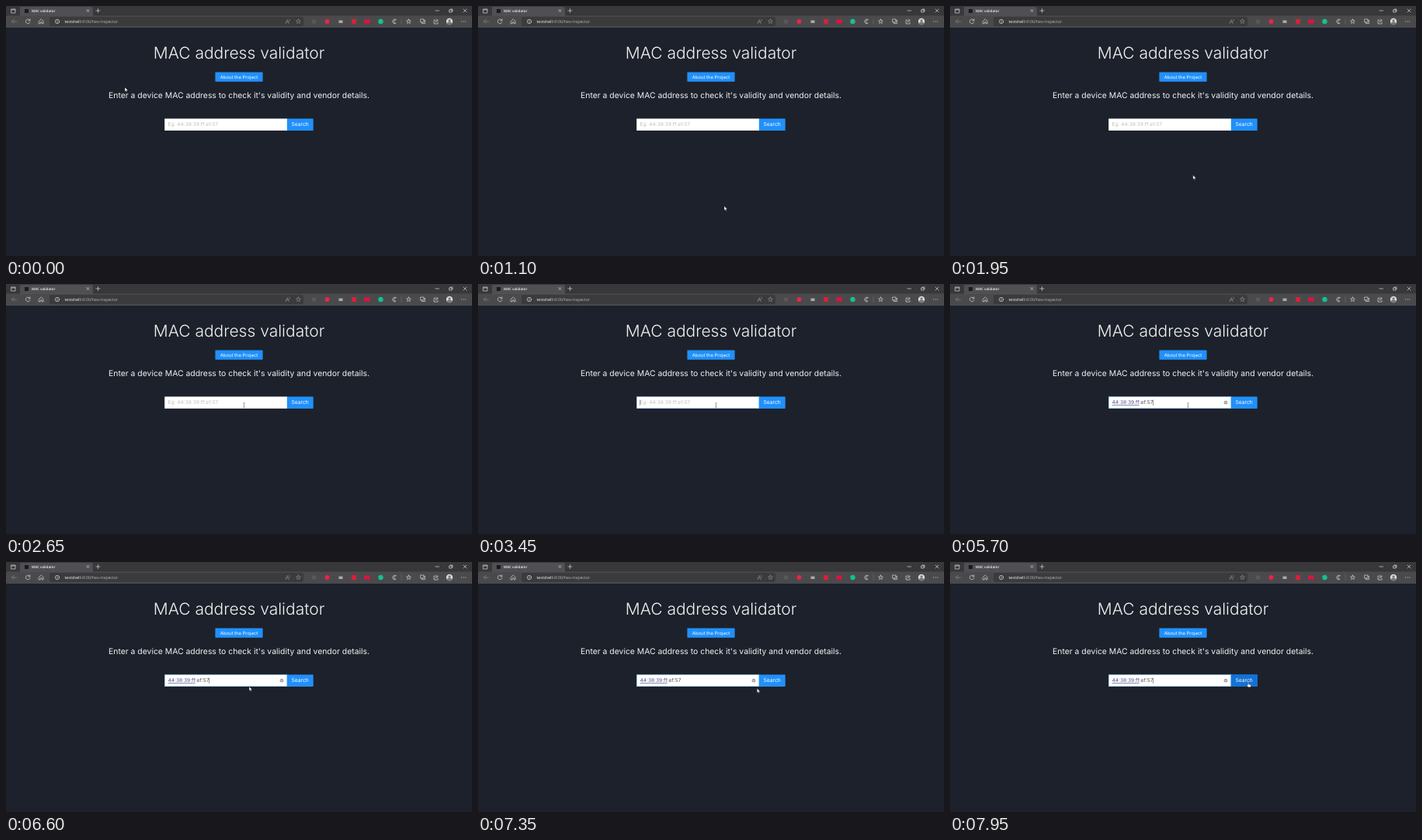
Recreate the animation shown at these times as an HTML page. Size 600 by 323 pixels, loop 8 s.

```html
<!DOCTYPE html>
<html lang="en">
<head>
<meta charset="utf-8">
<title>MAC validator</title>
<style>
  html, body { margin: 0; width: 100%; height: 100%; overflow: hidden; background: #1d212b; }
  svg { display: block; width: 100%; height: 100%; }
  text { font-family: Inter, "Open Sans", sans-serif; text-rendering: geometricPrecision; white-space: pre; }
  .ui { font-family: "Open Sans", "Noto Sans", sans-serif; }
  .mid { text-anchor: middle; }
  .icon { fill: none; stroke: #d4d4d6; stroke-width: .7; stroke-linecap: round; stroke-linejoin: round; }
  .dim { stroke: #8b8b8e; }
</style>
</head>
<body>
<svg viewBox="0 0 600 323">
  <rect width="600" height="323" fill="#1d212b"/>

  <!-- Browser frame -->
  <rect width="600" height="13" fill="#38383b"/>
  <rect y="12.500" width="600" height="15.500" fill="#4a4a4d"/>
  <path d="M18 13V3q0-2 2-2h90q2 0 2 2v10z" fill="#504f53"/>
  <rect x="56" y="14" width="327" height="12" rx="2" fill="#3b3b3e"/>
  <rect x="24" y="4" width="5" height="5" fill="#1b1b1e"/>
  <text class="ui" x="33" y="8" font-size="4.500" font-weight="600" fill="#f2f2f2">MAC validator</text>
  <text class="ui" x="75.500" y="21.800" font-size="5.200" fill="#bdbdc0"><tspan fill="#fff">testshell</tspan>:4100/hex-inspector</text>
  <g class="icon">
    <path d="M7 4h5v5h-5zM7 5h5"/>
    <path d="M104 4.500l3 3m0-3l-3 3M116 6h5m-2.500-2.500v5"/>
    <path d="M553 6h4.500M571 5h3v3h-3zM572 5v-1h3v3h-1M589 4l4 4m0-4l-4 4"/>
    <path class="dim" d="M13.500 20h-6m2.500-2.500l-2.500 2.500l2.500 2.500"/>
    <path d="M30.700 18.500a2.800 2.800 0 1 0 .2 2.300M31 16.800v2h-2"/>
    <path d="M42.500 19.500l2.800-2.500l2.800 2.500v3.300h-1.800v-2h-2v2h-1.800z"/>
    <circle cx="66" cy="20" r="2.700"/><path d="M66 19.800v1.500M66 18.500v.1"/>
    <path class="dim" d="M360 22.500l2.200-5l2.200 5M361 20.800h2.600M365 17q1 1 0 2.500"/>
    <path d="M502 17.600a2.800 2.800 0 1 0 0 4.800q-2.500-.4-2.500-2.400t2.500-2.400z"/>
    <path d="M509 16.500v7" stroke="#68686b"/>
    <path d="M534 17h4v4h-4zM535.500 21v1.500h4v-4h-1.500"/>
    <path d="M553 18h-2v5h5v-2M552.500 21q.5-2.500 3.500-2.500m-1.500-1.500l1.500 1.500l-1.500 1.500"/>
    <path d="M586.500 20h.1M589 20h.1M591.500 20h.1" stroke-width="1"/>
  </g>
  <g id="stars" class="icon"></g>
  <rect x="394" y="17.500" width="5" height="5" fill="#59595c"/>
  <circle cx="413.500" cy="20" r="3" fill="#e82545"/>
  <rect x="428.500" y="18.500" width="5" height="3.500" fill="#a9a9ad"/>
  <rect x="445" y="17" width="6" height="6" fill="#d52138"/>
  <rect x="461.500" y="17.500" width="7" height="5" fill="#e60f3c"/>
  <circle cx="482.500" cy="20" r="3.200" fill="#16c08c"/>
  <circle cx="571" cy="20" r="4.200" fill="#d8d8da"/>
  <path d="M568 22.900a3 2.600 0 0 1 6 0a4.200 4.200 0 0 1-6 0z" fill="#77777b"/>
  <circle cx="571" cy="18.800" r="1.500" fill="#77777b"/>

  <!-- Page -->
  <text class="mid" x="300" y="67.500" font-size="21" font-weight="300" fill="#f1f1f2">MAC address validator</text>
  <rect x="269.400" y="85.500" width="61.200" height="12.200" rx=".6" fill="#2190fb"/>
  <text class="mid" x="300" y="93.700" font-size="5.900" fill="#fff">About the Project</text>
  <text class="mid" x="300" y="118.500" font-size="10.400" fill="#f1f1f2">Enter a device MAC address to check it's validity and vendor details.</text>

  <rect x="204.200" y="145.500" width="158" height="15.400" fill="#fff"/>
  <rect id="ring" x="204.450" y="145.750" width="157.500" height="14.900" fill="none" stroke="#40a9ff" stroke-width=".5"/>
  <text id="hint" x="208.500" y="155.200" font-size="6.600" fill="#c0c0c2">Eg: 44:38:39:ff:ef:57</text>
  <g id="entry">
    <text id="value" x="208.500" y="155.200" font-size="6.600" fill="#50505a"><tspan id="checked">44:38:39:ff</tspan>:ef:57</text>
    <circle cx="355" cy="153.200" r="2.400" fill="#a2a2a5"/>
    <path d="M354.200 152.400l1.600 1.600m0-1.600l-1.600 1.600" stroke="#fff" stroke-width=".5"/>
  </g>
  <path id="caret" d="M0 149.600v7.400" stroke="#333" stroke-width=".5"/>
  <rect x="361.800" y="145.500" width="33.900" height="15.400" rx=".6" fill="#2190fb"/>
  <rect id="hover" x="361.800" y="145.500" width="33.900" height="15.400" rx=".6" fill="#1372d6"/>
  <text class="mid" x="378.600" y="155.300" font-size="6.700" fill="#fff">Search</text>

  <g id="pointer" stroke-linejoin="round">
    <path id="arrow" d="M0 0v5.600l1.300-1.200l.8 1.900l.9-.4l-.8-1.800h1.800z" fill="#fff" stroke="#111" stroke-width=".35"/>
    <path id="beam" d="M-1-2.700h2M0-2.700v5.400M-1 2.700h2" fill="none" stroke="#444" stroke-width=".5"/>
    <path id="hand" d="M-.6.2q.6-.8 1.200 0v2.200l2.300.6q.7.200.6 1l-.5 2.200h-3l-1.900-2.500q.2-1 1.300-.1z" fill="#fff" stroke="#111" stroke-width=".4"/>
  </g>
</svg>
<script>
const LOOP = 8000, FOCUS = 3150, PASTE = 4440, CHECKED = 5000, HOVER = 7430, BLINK = 530;
// Pointer stops: time, x, y
const stops = [
  [0, 153, 105], [120, 153, 105], [800, 317, 258.5], [1600, 317, 258.5],
  [2420, 306.5, 156.5], [6410, 306.5, 156.5], [6960, 330, 172.5], [7700, 384, 155.5], [LOOP, 384, 155.5]
];
const $ = id => document.getElementById(id);
const clamp = v => Math.max(0, Math.min(1, v));
const smooth = v => v * v * (3 - 2 * v);
const fade = (t, start) => clamp((t - start) / 300);
const show = (id, on) => { $(id).style.display = on ? "" : "none"; };

function star(cx, cy, r) {
  const points = Array.from({ length: 10 }, (_, i) => {
    const a = i * Math.PI / 5 - Math.PI / 2, d = i % 2 ? r * .45 : r;
    return `${cx + d * Math.cos(a)},${cy + d * Math.sin(a)}`;
  });
  return `<polygon points="${points.join(" ")}"/>`;
}
$("stars").innerHTML = `<g class="dim">${star(376.5, 20, 3)}</g>${star(518.5, 20, 3)}`;

function pointerAt(t) {
  const i = stops.findIndex(s => s[0] > t);
  const [t0, x0, y0] = stops[i - 1], [t1, x1, y1] = stops[i];
  const k = smooth((t - t0) / (t1 - t0));
  return [x0 + (x1 - x0) * k, y0 + (y1 - y0) * k];
}

function draw(t) {
  const [x, y] = pointerAt(t);
  const inRow = y > 145.5 && y < 160.4;
  const overInput = inRow && x > 204 && x < 361.8;
  const overButton = inRow && x >= 361.8 && x < 395.7;
  $("pointer").setAttribute("transform", `translate(${x} ${y})`);
  show("beam", overInput);
  show("hand", overButton);
  show("arrow", !overInput && !overButton);

  const pasted = t >= PASTE;
  show("hint", !pasted);
  show("entry", pasted);
  const checked = t >= CHECKED;
  $("checked").setAttribute("text-decoration", checked ? "underline" : "none");
  $("checked").setAttribute("fill", checked ? "#50508c" : "#50505a");

  const sinceEdit = t - (pasted ? PASTE : FOCUS);
  show("caret", sinceEdit >= 0 && sinceEdit % (2 * BLINK) < BLINK);
  const caretX = 208.6 + (pasted ? $("value").getComputedTextLength() : 0);
  $("caret").setAttribute("transform", `translate(${caretX} 0)`);

  $("ring").setAttribute("opacity", .8 * fade(t, FOCUS));
  $("hover").setAttribute("opacity", fade(t, HOVER));
}

const begin = performance.now();
function tick() {
  draw((performance.now() - begin) % LOOP);
  requestAnimationFrame(tick);
}
tick();
</script>
</body>
</html>
```
